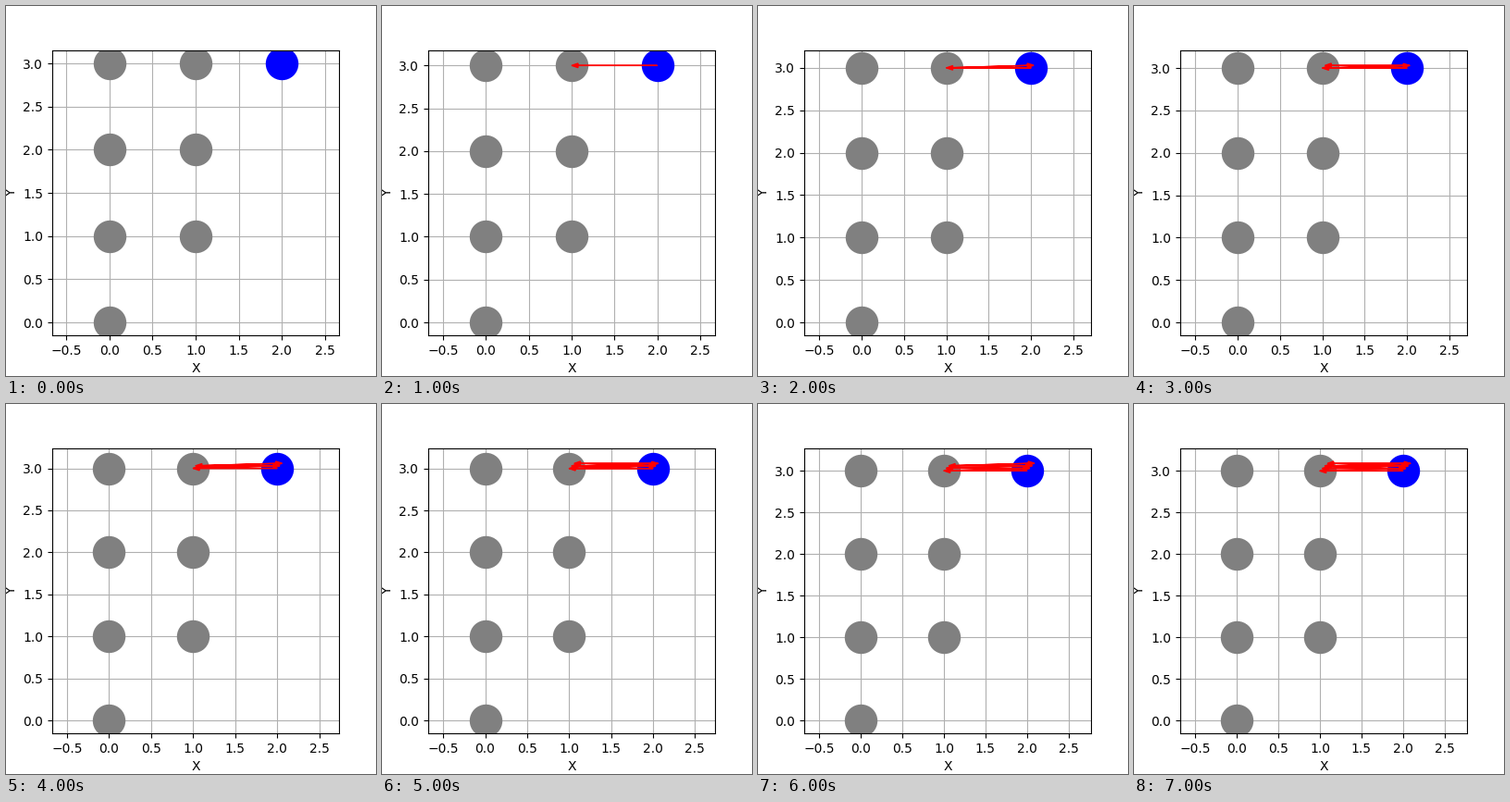
Write a matplotlib script that moves like this. It is 400 px wide and 400 px high and loops after 8 s.

```python
import matplotlib.pyplot as plt
from matplotlib.animation import FuncAnimation

FRAMES = 8
DRIFT = 0.03  # shift of the path after each round trip
VISITED = [(0, y) for y in range(4)] + [(1, y) for y in range(1, 4)]
START = (2, 3)

fig, ax = plt.subplots(figsize=(4, 4), dpi=100)


def stop(i):
    """Point reached after i moves, alternating right and left."""
    shift = DRIFT * (i // 2)
    return START[0] - i % 2 + shift, START[1] + shift


def dots(points, color):
    ax.scatter(*zip(*points), s=600, color=color)


def draw_move(i):
    (x0, y0), (x1, y1) = stop(i), stop(i + 1)
    ax.arrow(x0, y0, x1 - x0, y1 - y0, head_width=0.05,
             length_includes_head=True, fc="red", ec="red")


def draw(frame):
    ax.clear()
    dots(VISITED, "gray")
    dots([START], "blue")
    for i in range(frame):
        draw_move(i)
    ax.set_xlabel("X")
    ax.set_ylabel("Y")
    ax.grid(True)
    ax.set_axisbelow(True)
    # equal units: the view widens to fit the autoscaled height
    ax.set_aspect("equal", adjustable="datalim")


anim = FuncAnimation(fig, draw, frames=FRAMES, interval=1000,
                     repeat=True, repeat_delay=0)
plt.show()
```
